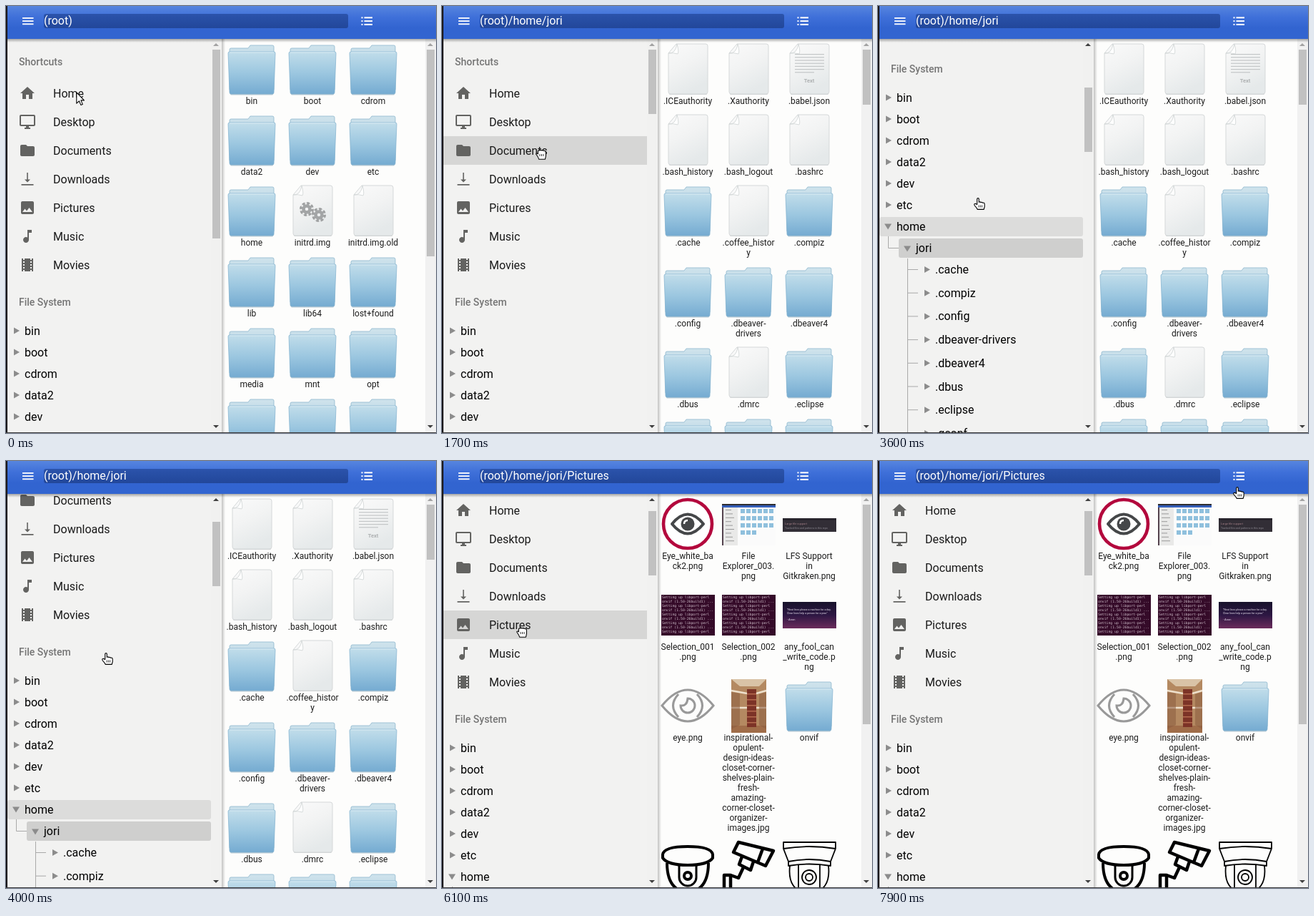
An HTML page for the animation above (8 s loop, 602x597 px).

```html
<!DOCTYPE html>
<html lang="en">
<head>
<meta charset="utf-8">
<title>File browser</title>
<style>
  html, body { margin: 0; width: 100%; height: 100%; overflow: hidden; background: #fdfdfc; }
  svg { display: block; width: 100vw; height: 100vh; font-family: Roboto, sans-serif; }
  .label { font-size: 12px; text-anchor: middle; fill: #1c1c1c; }
  .head { font-size: 14px; font-weight: 500; fill: #757575; }
  .item { font-size: 16px; fill: #1a1a1a; }
  .ink { fill: none; stroke: #000; stroke-linejoin: round; }
</style>
</head>
<body>
<svg id="stage" viewBox="0 0 602 597" preserveAspectRatio="none"></svg>
<script>
const LOOP = 8000;
const USER = 'jori';
const stage = document.getElementById('stage');

const rect = (x, y, w, h, fill, extra = '') =>
  `<rect x="${x}" y="${y}" width="${w}" height="${h}" fill="${fill}" ${extra}/>`;
const path = (d, extra = '') => `<path d="${d}" ${extra}/>`;
const text = (x, y, s, extra = '') => `<text x="${x}" y="${y}" ${extra}>${s}</text>`;
const group = (x, y, body, extra = '') => `<g transform="translate(${x} ${y})" ${extra}>${body}</g>`;
const times = (n, fn) => Array.from({ length: n }, (_, i) => fn(i)).join('');
const gradient = (id, stops, dir = 'x2="0" y2="1"') =>
  `<linearGradient id="${id}" ${dir}>` + stops.map((c, i) =>
    `<stop offset="${i / (stops.length - 1)}" stop-color="${c}"/>`).join('') + '</linearGradient>';

const defs = '<defs>' +
  gradient('bar', ['#5685df', '#3f70d9', '#3264d0', '#3265d0']) +
  gradient('field', ['#2b53ab', '#22479a']) +
  gradient('back', ['#cfe3ec', '#9fc6dc']) +
  gradient('front', ['#c1ddea', '#9cc7e0', '#75abd1']) +
  gradient('paper', ['#fafafa', '#f2f3f3', '#e5e9ea'], 'x2=".4" y2="1"') +
  gradient('slide', ['#17122b', '#2d1743', '#6b2c5c']) +
  gradient('drop', ['rgba(0,0,0,.32)', 'rgba(0,0,0,0)']) +
  gradient('side', ['rgba(0,0,0,.24)', 'rgba(0,0,0,0)'], 'x2="1" y2="0"') +
  '<clipPath id="pane"><rect x="2" y="46" width="300" height="550"/></clipPath></defs>';

// Thumbnails: origin is the column centre at the middle of the first label line.
const paper =
  rect(-26, -12, 53, 3, '#d0d4d5', 'rx="1.5"') +
  path('M-27-67L-16-80H25q3 0 3 3V-13q0 3-3 3H-24q-3 0-3-3z', 'fill="url(#paper)" stroke="#d5d8d9"') +
  path('M-27-67Q-17-66-15-80Q-12-69-14-66Q-20-68-27-67z', 'fill="#fff" stroke="#cfd3d4" stroke-width=".8"');

const gear = (x, y, r) => group(x, y,
  `<circle r="${r}" fill="none" stroke="#a3a5a6" stroke-width="4" stroke-dasharray="3.6 ${(r * 6.2832 / 8 - 3.6).toFixed(2)}"/>` +
  `<circle r="${r - 3.5}" fill="none" stroke="#a3a5a6" stroke-width="4.5"/>` +
  `<circle r="${r + 1}" fill="none" stroke="#777" stroke-opacity=".3" stroke-width=".7"/>`);

const terminal = rect(-37, -73, 75, 57, '#350b29') +
  times(9, i => text(-36, -68.5 + i * 6,
    i % 2 ? 'onvif (1.50-26build1) ...' : 'Setting up libport-perl', 'font-size="4.8" fill="#cdbdc8" font-family="\'DejaVu Sans Mono\',monospace"'));

const thumbs = {
  folder:
    rect(-30, -12, 60, 3.5, '#b9cbd6', 'rx="1.5"') +
    path('M-31-16V-72q0-2 2-2H-5l3-4H29q2 0 2 2V-16z', 'fill="url(#back)" stroke="#8db6cd" stroke-width=".8"') +
    path('M-33-67q0-2 2-2H31q2 0 2 2L31-12q0 2-2 2H-29q-2 0-2-2z', 'fill="url(#front)" stroke="#7eafcd" stroke-width=".7"') +
    path('M-31-68H31', 'stroke="#dcedf4"'),
  file: paper,
  doc: paper +
    times(7, i => rect(-20, -66 + i * 4.2, i === 6 ? 27 : 41, 1.2, '#c3c6c7')) +
    text(0, -26, 'Text', 'font-size="7.5" font-weight="700" fill="#aeb1b2" text-anchor="middle"'),
  gears: paper + gear(-8, -47, 8) + gear(9, -39, 8),
  ring:
    '<circle cy="-45" r="34" fill="#fff" stroke="#b3083d" stroke-width="4.6"/>' +
    path('M-22-45Q0-72 22-45Q0-18-22-45z', 'fill="#fff" stroke="#454749" stroke-width="4" stroke-linejoin="round"') +
    '<circle cy="-45" r="9.5" fill="#454749"/>' +
    path('M-5-45Q-5-50 0-50', 'fill="none" stroke="#fff" stroke-width="2.5"'),
  shot:
    rect(-37, -73, 75, 58, '#fbfbfb') + rect(-37, -73, 75, 2, '#2d2d30') + rect(-37, -71, 75, 3, '#355fba') +
    rect(-37, -68, 22, 53, '#e9e9e8') + rect(-37, -68, 2, 53, '#54434e') +
    times(9, i => rect(-32, -65 + i * 5.4, 8 + i % 3 * 2, 1, '#999')) +
    times(21, i => rect(-11 + i % 6 * 8, -66 + (i / 6 | 0) * 10, 6, 6, '#8fc0dd')),
  strip:
    rect(-37, -53, 75, 19, '#322e36') + rect(-37, -53, 75, 3, '#28252c') +
    text(-34, -44, 'Large file support', 'font-size="4" fill="#a58088"') +
    text(-34, -38, 'Tracked files and patterns in this repo', 'font-size="3.6" fill="#8d8a93"'),
  terminal,
  slide:
    rect(-37, -63, 75, 37, 'url(#slide)') +
    text(-31, -51, '“Neat lines please a machine for a day.', 'font-size="3.6" fill="#efe8f4"') +
    text(-31, -46, 'Clear lines help a person for a year.”', 'font-size="3.6" fill="#efe8f4"') +
    text(-31, -37, '- Anon', 'font-size="4" fill="#efe8f4"'),
  eye:
    '<g fill="none" stroke="#999" stroke-width="3">' +
    path('M-36-45Q0-89 36-45Q0-1-36-45z') +
    path('M-13-61Q-28-45-13-29M13-61Q28-45 13-29') +
    path('M0-55A10 10 0 1 1-10-45Q-1-44 0-55z') + '</g>',
  closet:
    rect(-24, -82, 49, 75, '#b48961') + path('M-24-82H25L15-72H-12z', 'fill="#d9c3a6"') +
    rect(-24, -17, 49, 10, '#a06d49') + rect(-2, -68, 13, 53, '#7c3327') +
    times(6, i => rect(-2, -62 + i * 8, 13, 1.5, '#b56b4f')) +
    path('M-24-66L-2-62M-24-42L-2-42M11-62L25-66M11-42L25-42', 'stroke="#eee0cc" stroke-width="2.5"') +
    path('M-24-64L-12-62V-18L-24-12zM15-61L25-64V-12L15-18z', 'fill="#8b5c3e" opacity=".55"'),
  dome: '<g class="ink" stroke-width="4">' +
    path('M-35-57V-62Q-33-73 0-73Q33-73 35-62V-57Q28-47 0-47Q-28-47-35-57z') +
    path('M-29-50Q-29-12 0-8Q29-12 29-50') +
    path('M-12-47V-30A12 12 0 0 0 12-30V-47', 'stroke-width="3"') +
    '<circle cy="-32" r="5"/></g>',
  bullet: '<g class="ink" stroke-width="4.5">' +
    path('M-14-79L-21-65L24-46L35-67zM20-70L13-51M-9-59L-13-48L3-40L7-52') +
    path('M-7-44L-14-29L-25-33M-34-33H-25V-5H-34z') + '</g>',
  ptz: '<g class="ink" stroke="#222" stroke-width="1.8">' +
    path('M-36-79H37V-70Q0-76-36-70zM-36-70L-29-52Q0-58 30-52L37-70M-29-52V-46Q0-51 30-46V-52') +
    path('M-27-46Q-31-10 0-8Q31-10 27-46M-15-48V-14M15-48V-14') +
    '<circle cy="-30" r="10"/><circle cy="-30" r="5"/></g>'
};

// Each entry is "thumb:line/line"; a bare name is a folder.
function grid(rows) {
  let y = 133, out = '';
  for (const row of rows) {
    let most = 1;
    row.split(' | ').forEach((entry, col) => {
      const [kind, name] = entry.includes(':') ? entry.split(':') : ['folder', entry];
      const lines = name.split('/');
      most = Math.max(most, lines.length);
      out += group(344 + col * 85, y, thumbs[kind] +
        lines.map((s, i) => text(0, 4 + i * 14, s, 'class="label"')).join(''));
    });
    y += 99 + 14 * (most - 1);
  }
  return out;
}

const views = [
  ['bin | boot | cdrom', 'data2 | dev | etc', 'home | gears:initrd.img | file:initrd.img.old',
   'lib | lib64 | lost+found', 'media | mnt | opt', 'proc | root | run'],
  ['file:.ICEauthority | file:.Xauthority | doc:.babel.json',
   'file:.bash_history | file:.bash_logout | file:.bashrc',
   '.cache | file:.coffee_histor/y | .compiz', '.config | .dbeaver-/drivers | .dbeaver4',
   '.dbus | file:.dmrc | .eclipse', '.gconf | .gnome | .gnupg'],
  ['ring:Eye_white_ba/ck2.png | shot:File/Explorer_003./png | strip:LFS Support/in/Gitkraken.png',
   'terminal:Selection_001/.png | terminal:Selection_002/.png | slide:any_fool_can/_write_code.p/ng',
   'eye:eye.png | closet:inspirational-/opulent-/design-ideas-/closet-corner-/shelves-plain-/fresh-/amazing-/corner-closet-/organizer-/images.jpg | onvif',
   'dome:dome.png | bullet:bullet.png | ptz:ptz.png']
];
const paths = ['(root)', `(root)/home/${USER}`, `(root)/home/${USER}/Pictures`];
const sideThumb = [264, 90, 90], gridThumb = [289, 77, 307];

const shortcuts = [
  ['Home', 'M10 20v-6h4v6h5v-8h3L12 3 2 12h3v8z'],
  ['Desktop', 'M21 2H3c-1.1 0-2 .9-2 2v12c0 1.1.9 2 2 2h7v2H8v2h8v-2h-2v-2h7c1.1 0 2-.9 2-2V4c0-1.1-.9-2-2-2zm0 14H3V4h18v12z'],
  ['Documents', 'M10 4H4c-1.1 0-2 .9-2 2v12c0 1.1.9 2 2 2h16c1.1 0 2-.9 2-2V8c0-1.1-.9-2-2-2h-8l-2-2z'],
  ['Downloads', 'M11.2 3h1.6v9.5H16l-4 4-4-4h3.2zM3.5 19h17v1.8h-17z'],
  ['Pictures', 'M21 19V5c0-1.1-.9-2-2-2H5c-1.1 0-2 .9-2 2v14c0 1.1.9 2 2 2h14c1.1 0 2-.9 2-2zM8.5 13.5l2.5 3.01L14.5 12l4.5 6H5l3.5-4.5z'],
  ['Music', 'M12 3v10.55c-.59-.34-1.27-.55-2-.55-2.21 0-4 1.79-4 4s1.79 4 4 4 4-1.79 4-4V7h4V3h-6z'],
  ['Movies', 'M18 3v2h-2V3H8v2H6V3H4v18h2v-2h2v2h8v-2h2v2h2V3h-2zM8 17H6v-2h2v2zm0-4H6v-2h2v2zm0-4H6V7h2v2zm10 8h-2v-2h2v2zm0-4h-2v-2h2v2zm0-4h-2V7h2v2z']
];

const closed = (x, y) => path(`M${x} ${y - 4.5}l8 4.5-8 4.5z`, 'fill="#8c8c8c"');
const opened = (x, y) => path(`M${x - 1} ${y - 3.5}h10l-5 8z`, 'fill="#8c8c8c"');
const node = (x, y, s) => text(x, y + 5.5, s, 'class="item" style="fill:#000"');

function sidebar() {
  const roots = ['bin', 'boot', 'cdrom', 'data2', 'dev', 'etc'];
  const kids = ['.cache', '.compiz', '.config', '.dbeaver-drivers', '.dbeaver4', '.dbus', '.eclipse', '.gconf', '.gnome'];
  return text(18, 83, 'Shortcuts', 'class="head"') +
    shortcuts.map(([name, d], i) => group(18, 110 + i * 40, path(d, 'fill="#636361"')) +
      text(66, 128 + i * 40, name, 'class="item"')).join('') +
    text(18, 419, 'File System', 'class="head"') +
    roots.map((s, i) => closed(11, 454 + i * 30) + node(26, 454 + i * 30, s)).join('') +
    opened(10, 634) + node(26, 634, 'home') +
    rect(29, 651, 258, 27, '#cfcfce', 'rx="3"') + opened(37, 665) + node(53, 664, USER) +
    path('M14.5 648V664.5H29M41.5 679V970', 'fill="none" stroke="#a9a9a9"') +
    kids.map((s, i) => {
      const y = 694.5 + i * 32.7;
      return path(`M41 ${y}h15`, 'stroke="#a9a9a9"') + closed(65, y) + node(80, y, s);
    }).join('');
}

const tip = (x, y, dir, fill, id = '') => path(`M${x - 4} ${y + 2 * dir}h8l-4 ${-4 * dir}z`, `fill="${fill}" ${id}`);

const hand = 'M1.2 10.8Q0 8.6 2.2 8.2L4.7 9.6V2Q4.8.6 6 .6T7.3 2V6.3Q9 5.4 9.9 6.6Q11.4 5.9 12.4 7.2Q14.8 6.5 15.2 9V12.5Q14.8 14 14.2 16.4H5.2Q4.8 14.8 1.2 10.8z';
const fist = 'M1.2 8.8Q0 6.8 2.4 7L3.4 7.8V4Q3.6 2.6 5.6 3Q6.8 1.8 8.2 3Q9.6 2 11 3.3Q14.4 2.8 14.4 6V10.5Q14 13 13.4 15.2H4.6Q4.2 13 1.2 8.8z';
const pointers = {
  arrow: path('M.8.8V16.2L4.4 12.8 6.8 18.4 9.3 17.4 6.9 11.9H11.4z'),
  fist: path(fist) + path('M6 8v3M8.5 8v3M11 8v3', 'stroke-width=".8"'),
  hand: path(hand) + path('M7.2 10.5v3M9.4 10.5v3M11.6 10.5v3', 'stroke-width=".8"')
};

stage.innerHTML = defs +
  rect(0, 0, 602, 597, '#fdfdfc') +
  views.map((rows, i) => `<g id="view${i}">${grid(rows)}</g>`).join('') +
  rect(587, 46, 15, 551, '#f1f1f1') + rect(589, 61, 11, 0, '#c1c1c1', 'id="gridThumb"') +
  tip(594, 54, 1, '#a3a3a3') + tip(594, 588, -1, '#404040') +
  rect(302, 46, 5, 551, 'url(#side)') +
  '<g clip-path="url(#pane)">' + rect(2, 46, 300, 551, '#f2f2f1') +
  '<g id="scroll">' + rect(2, 0, 285, 40, '#d6d6d5', 'id="hover"') + sidebar() + '</g>' +
  rect(287, 46, 14, 551, '#f1f1f0') + '</g>' +
  rect(289, 61, 11, 0, '#c1c1c1', 'id="sideThumb"') +
  tip(294, 54, 1, '#404040', 'id="sideUp"') + tip(294, 588, -1, '#404040') +
  rect(0, 46, 602, 5, 'url(#drop)') + rect(0, 0, 602, 46, 'url(#bar)') +
  rect(53, 11, 426, 20, 'url(#field)', 'rx="3"') +
  times(3, i => rect(23, 16 + i * 4.2, 15.5, 1.8, '#fff')) +
  times(3, i => rect(497.5, 15.3 + i * 4.8, 2, 2, '#fff') + rect(501.5, 15.3 + i * 4.8, 11.5, 2, '#fff')) +
  text(53, 26, '', 'id="path" font-size="16" fill="#fff"') +
  rect(0, 0, 2, 597, '#19171b') + rect(0, 596, 602, 1, '#3a3a3c') +
  '<g id="cursor" fill="#fff" stroke="#000" stroke-width="1.1" stroke-linejoin="round">' +
  Object.entries(pointers).map(([k, s]) => `<g id="${k}">${s}</g>`).join('') + '</g>';

const el = Object.fromEntries([...stage.querySelectorAll('[id]')].map(n => [n.id, n]));
const set = (id, name, value) => el[id].setAttribute(name, value);
const show = (id, on) => set(id, 'visibility', on ? 'visible' : 'hidden');

// Key lists are [time, ...values].
const held = (keys, t) => keys.filter(k => k[0] <= t).pop()[1];
function tween(keys, t) {
  const i = keys.findIndex(k => k[0] > t);
  if (i < 0) return keys[keys.length - 1].slice(1);
  if (i === 0) return keys[0].slice(1);
  const a = keys[i - 1], b = keys[i], u = (t - a[0]) / (b[0] - a[0]);
  return a.slice(1).map((v, j) => v + (b[j + 1] - v) * u);
}

const HOME_NODE = 9;
const viewKeys = [[0, 0], [1300, 1], [5900, 2]];
const hoverKeys = [[0, -1], [500, 0], [1400, 1], [1600, 2], [1800, 3], [1900, 4],
  [2800, HOME_NODE], [4200, -1], [4800, 5], [5300, 4], [6600, -1]];
const scrollKeys = [[2100, 0], [2200, 35], [2400, 134], [2700, 340], [2800, 371],
  [3500, 371], [4000, 147], [4200, 106], [4400, 106], [4800, 53]];
const pointerKeys = [[0, 'arrow'], [1000, 'fist'], [1800, 'hand'], [5300, 'fist'], [6600, 'arrow'], [7300, 'hand']];
const cursorKeys = [[900, 98, 120], [1000, 95, 121], [1200, 95, 121], [1700, 131, 199], [1900, 134, 268],
  [5000, 134, 268], [5300, 119, 264], [5500, 104, 231], [6200, 104, 231], [6800, 372, 235],
  [6900, 372, 235], [7100, 462, 53], [7200, 462, 53], [7900, 497, 36]];

function draw(time) {
  const t = Math.floor(time / 100) * 100;
  const view = held(viewKeys, t), hover = held(hoverKeys, t), pointer = held(pointerKeys, t);
  const [y] = tween(scrollKeys, t), [cx, cy] = tween(cursorKeys, t);

  views.forEach((_, i) => show('view' + i, i === view));
  el.path.textContent = paths[view];
  set('gridThumb', 'height', gridThumb[view]);
  set('sideThumb', 'height', sideThumb[view]);
  set('sideThumb', 'y', Math.round(61 + y * 0.163));
  set('sideUp', 'fill', y > 0 ? '#404040' : '#a3a3a3');
  set('scroll', 'transform', `translate(0 ${-Math.round(y)})`);

  const tree = hover === HOME_NODE;
  show('hover', hover >= 0);
  set('hover', 'y', tree ? 621 : 102 + hover * 40);
  set('hover', 'height', tree ? 27 : 40);
  set('hover', 'rx', tree ? 3 : 0);
  set('hover', 'fill', tree ? '#dcdcdb' : '#d6d6d5');

  for (const k in pointers) show(k, k === pointer);
  set('cursor', 'transform', `translate(${Math.round(cx)} ${Math.round(cy)})`);
}

function loop() {
  draw(performance.now() % LOOP);
  requestAnimationFrame(loop);
}
loop();
</script>
</body>
</html>
```
